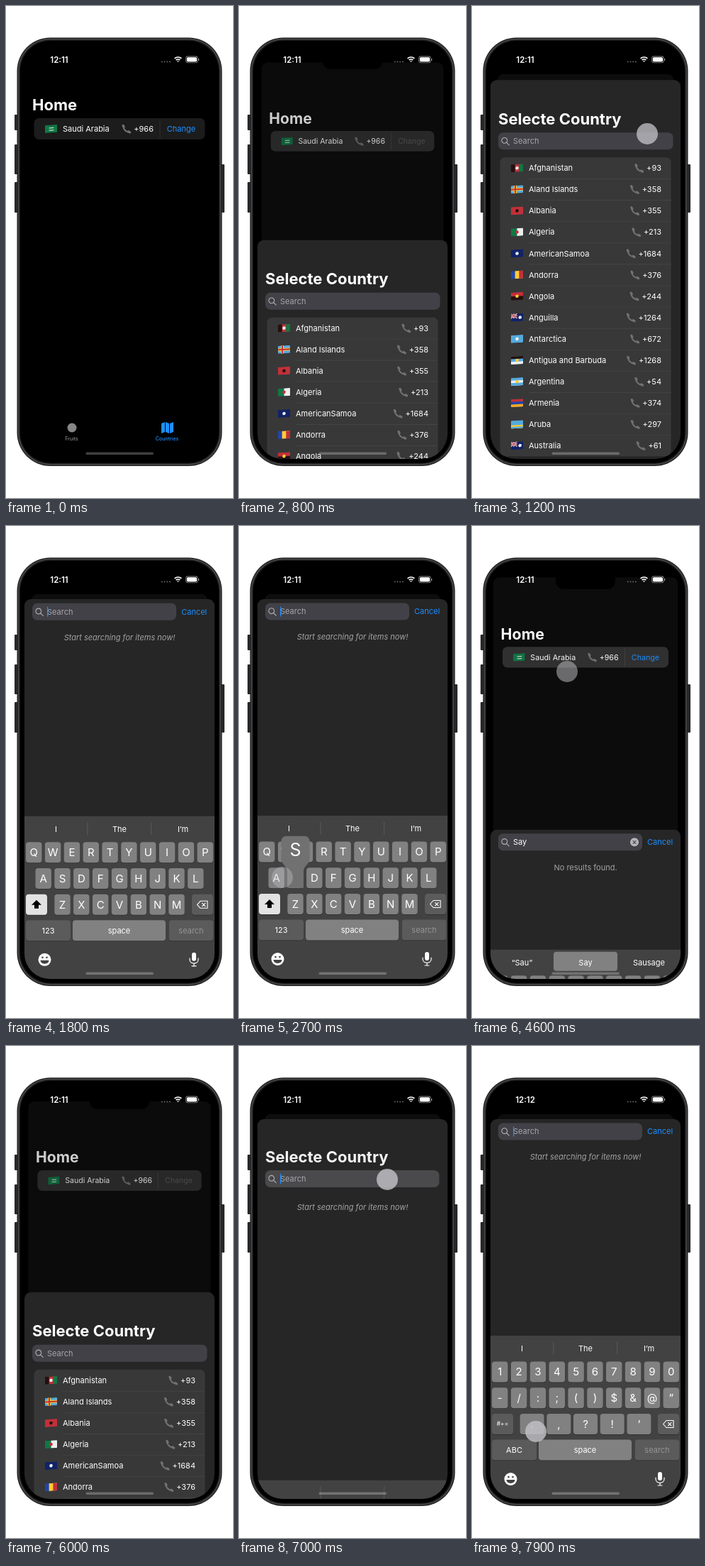
An HTML page with a canvas for the animation above (8 s loop, 320 by 693 pixels).

```html
<!DOCTYPE html>
<html lang="en">
<head>
<meta charset="utf-8">
<title>Country picker</title>
<style>
  html, body { margin: 0; width: 100%; height: 100%; overflow: hidden; background: #fff; }
  canvas { display: block; width: 320px; height: 693px; }
</style>
</head>
<body>
<canvas></canvas>
<script>
const canvas = document.querySelector('canvas');
const c = canvas.getContext('2d');
const LOOP = 8000, SCREEN_BOTTOM = 638, SHEET_TOP = 103, ROW = 30.08;
const BLUE = '#1e8fff', WHITE = '#fff';

// Flags: direction and stripe colours, then *disc, +cross or u for a canton
const dyes = { r: '#c23038', g: '#174', b: '#24a', n: '#126', s: '#5ad', w: '#eee', y: '#fc3', k: '#211', o: '#fa2' };
const countries = `Afghanistan +93 vkrg *w
Aland Islands +358 hs +y +r
Albania +355 hr *k
Algeria +213 vgw *r
AmericanSamoa +1684 hn *w
Andorra +376 vbyr
Angola +244 hrk *y
Anguilla +1264 hn u *w
Antarctica +672 hs *w
Antigua and Barbuda +1268 hksw *y
Argentina +54 hsws *y
Armenia +374 hrbo
Aruba +297 hsssys
Australia +61 hn u *w
Samoa +685 hr *n
San Marino +378 hws *y
Sao Tome and Principe +239 hgyg
Saudi Arabia +966 hg =w
Senegal +221 vgyr
Serbia +381 hrbw
Seychelles +248 vbyrwg
Sierra Leone +232 hgws
Singapore +65 hrw`.split('\n').map(line => {
  const [, name, code, flag] = line.match(/(.+) (\+\d+) (.+)/);
  return { name, code, flag: flag.split(' ') };
});
const home = countries.find(x => x.code === '+966');

const clamp = v => Math.max(0, Math.min(1, v));
const mix = (a, b, k) => a + (b - a) * k;
const smooth = v => v * v * (3 - 2 * v);
const gray = v => `rgb(${v},${v},${v})`;
function spring(ms, speed = 16) {
  const x = Math.max(0, ms) / 1000 * speed;
  return 1 - (1 + x) * Math.exp(-x);
}

function box(x, y, w, h, color, r = 0) {
  c.fillStyle = color;
  c.beginPath();
  c.roundRect(x, y, w, h, r);
  c.fill();
}
function disc(x, y, r, color) {
  box(x - r, y - r, 2 * r, 2 * r, color, r);
}
function shape(path, color) {
  c.fillStyle = color;
  c.fill(new Path2D(path));
}
function stroke(path, color, width) {
  c.strokeStyle = color;
  c.lineWidth = width;
  c.lineCap = c.lineJoin = 'round';
  c.stroke(new Path2D(path));
}
function text(s, x, y, size = 11, color = WHITE, align = 'left', style = '') {
  c.font = `${style} ${size}px Inter, sans-serif`;
  c.fillStyle = color;
  c.textAlign = align;
  c.fillText(s, x, y + size * 0.36);
  return c.measureText(s).width;
}
function at(x, y, draw) {
  c.save();
  c.translate(x, y);
  draw();
  c.restore();
}

function drawFlag([stripes, ...marks], y) {
  const w = 17, h = 11, colors = [...stripes.slice(1)].map(s => dyes[s]), n = colors.length;
  at(55, y - h / 2, () => {
    c.transform(1, -0.06, 0, 1, 0, 0.5);
    c.beginPath();
    c.roundRect(0, 0, w, h, 1);
    c.clip();
    colors.forEach((color, i) => stripes[0] === 'h'
      ? box(0, i * h / n, w, h, color) : box(i * w / n, 0, w, h, color));
    marks.forEach(([kind, dye], i) => {
      const color = dyes[dye];
      if (kind === '*') disc(i ? w * 0.75 : w / 2, h / 2, 2.3, color);
      if (kind === '+') stroke('M6 0V11M0 5.5H17', color, 4 - 2 * i);
      if (kind === '=') stroke('M6 4.3H12M6 7.5H12', color, 1);
      if (kind === 'u') for (const [ink, width] of [[WHITE, 1.6], [dyes.r, 0.8]])
        stroke('M0 0L8 6M8 0L0 6M4 0V6M0 3H8', ink, width);
    });
  });
}
function drawCode(code, right, y) {
  const width = text(code, right, y, 11, WHITE, 'right');
  at(right - width - 10.5, y, () => {
    stroke('M-4.8 -4C-4 1 -1 4 4.3 5', '#717173', 2);
    stroke('M-4.7 -4.6L-3.6 -2.7M3 3.8L5 5', '#717173', 3.2);
  });
}

function drawHome(p, presenting) {
  const s = 1 - 0.075 * p, raised = clamp(p * 4);
  c.save();
  c.translate(160, 57 + 39 * p);
  c.scale(s, s);
  c.translate(-160, -57);
  box(26, 57, 268, 581, gray(11 * raised + 9 * p * p), 9 * raised);
  text('Home', 37, 139, 22, WHITE, 'left', 'bold');
  box(39.5, 158, 241, 30, gray(mix(28, 50, raised)), 7);
  drawFlag(home.flag, 173);
  text(home.name, 80, 173);
  drawCode(home.code, 208, 173);
  box(216.7, 161, 0.7, 25, 'rgba(255,255,255,.12)');
  text('Change', 247, 173, 11, presenting ? '#5a5a5d' : BLUE, 'center');
  disc(93, 594, 6.5, '#868686');
  text('Fruits', 92.5, 609, 7, '#868686', 'center', '500');
  for (let i = 0; i < 3; i++) {
    const tilt = i % 2 ? 2 : -2;
    shape(`M${219 + 6 * i} ${587 - tilt / 2}l5 ${tilt}v14l-5 ${-tilt}z`, BLUE);
  }
  text('Countries', 227, 609, 7, BLUE, 'center', '500');
  box(26, 57, 268, 581, `rgba(0,0,0,${(presenting ? 0.35 : 0.08) * p})`);
  c.restore();
}

function drawList(items, top) {
  box(39.5, top, 241, items.length * ROW, '#383839', 7);
  items.forEach((item, i) => {
    const y = top + ROW * (i + 0.5);
    drawFlag(item.flag, y);
    text(item.name, 80, y);
    drawCode(item.code, 267, y);
    if (i) box(80, y - ROW / 2, 200.5, 0.6, 'rgba(255,255,255,.08)');
  });
}

function drawSearchField(y, width, searching, query, caret, pressed) {
  box(37, y - 12, width, 24, pressed ? '#4a4a4c' : '#414147', 7);
  at(46.5, y, () => stroke('M3.2 -.8A3.9 3.9 0 1 1 -4.6 -.8A3.9 3.9 0 1 1 3.2 -.8M2.1 2L5.8 5.6', '#b0b0b5', 1.1));
  const typed = text(query || 'Search', 58, y, 11, query ? WHITE : '#a5a5ab');
  if (searching && caret) box(query ? 58.5 + typed : 58, y - 7, 1.3, 14, BLUE);
  if (query) {
    disc(229, y, 6, '#b5b5b9');
    at(229, y, () => stroke('M-2 -2L2 2M2 -2L-2 2', '#414147', 1.1));
  }
}

function drawSheet(top, nav, searching, query, caret, pressed) {
  box(26, top, 268, 700, '#262626', [9, 9, 0, 0]);
  const y = top + mix(86, 17.5, nav);
  c.globalAlpha = clamp(1 - 1.8 * nav);
  text('Selecte Country', 37, y - 31.5, 22, WHITE, 'left', 'bold');
  c.globalAlpha = nav;
  text('Cancel', mix(293, 247, nav), y, 11, BLUE);
  c.globalAlpha = 1;

  const found = query && countries.filter(x => x.name.startsWith(query));
  if (!searching) drawList(countries.slice(0, 14), top + 109);
  else if (!query) text('Start searching for items now!', 160, y + mix(40, 36, nav), 11, '#a3a3a6', 'center', 'italic');
  else if (found.length) drawList(found, y + 23);
  else text('No results found.', 160, y + 36, 11, '#a3a3a6', 'center');
  drawSearchField(y, mix(246.5, 203, nav), searching, query, caret, pressed);
}

function drawKey(label, x, y, w = 22.5, fill = '#818181', size = 15, color = WHITE) {
  box(x - w / 2, y - 14, w, 29.3, '#2b2b2b', 4);
  box(x - w / 2, y - 14.5, w, 29, fill, 4);
  text(label, x, y, size, color, 'center');
}
function drawPopup(letter, x, y) {
  at(x, y, () => {
    box(-20, -59, 40, 38, '#717171', 7);
    shape('M-20 -28C-20 -18 -11.5 -18 -11.5 -9V14H11.5V-9C11.5 -18 20 -18 20 -28Z', '#717171');
    text(letter, 0, -39.5, 25, WHITE, 'center');
  });
}

function drawSuggestions(query) {
  const words = {
    '': ['I', 'The', 'I’m'], S: ['“S”', 'So', 'She'], Sa: ['“Sa”', 'Say', 'San'],
  }[query] || ['“Sau”', 'Say', 'Sausage'];
  if (query.length > 2) box(115, 411, 90, 27, '#818181', 4);
  else for (const x of [114.5, 204.3]) box(x, 416.5, 0.8, 18, '#5e5e5e');
  return () => words.forEach((word, i) => text(word, 70.5 + 89.5 * i, 426, 11, WHITE, 'center'));
}

function drawKeyboard(query, numeric, popup, ready) {
  const dark = '#5b5b5b', shifted = !query;
  box(26, 408, 268, 240, '#424242');
  const drawWords = drawSuggestions(query);
  if (ready) drawWords();

  let bubble;
  const rows = numeric ? ['1234567890', '-/:;()$&@”', '.,?!’'] : ['QWERTYUIOP', 'ASDFGHJKL', 'ZXCVBNM'];
  rows.forEach((row, r) => {
    const wide = row.length === 5, pitch = wide ? 37.7 : 26.83;
    [...row].forEach((char, i) => {
      const x = 160 + (i - (row.length - 1) / 2) * pitch, y = 459 + r * 36.7;
      const label = shifted ? char : char.toLowerCase();
      drawKey(label, x, y, wide ? 34 : 22.5);
      if (label === popup) bubble = [label, x, y];
    });
  });

  drawKey(numeric ? '#+=' : '', 43, 532.4, 30, shifted && !numeric ? '#e2e2e2' : dark, 8.5);
  if (!numeric) shape('M43 526l7 7h-4v5h-6v-5h-4z', shifted ? '#000' : WHITE);
  drawKey('', 277, 532.4, 30, dark);
  stroke('M269.5 532.5l4.5 -5h10v10h-10zM276.5 530.3l4.5 4.5m0 -4.5l-4.5 4.5', WHITE, 1.1);
  drawKey(numeric ? 'ABC' : '123', 59.5, 569, 63, dark, 11);
  drawKey('space', 159.5, 569, 131, '#818181', 11);
  drawKey('search', 261, 569, 62.5, dark, 11, query ? WHITE : '#949494');

  disc(54.5, 610, 9, WHITE);
  for (const x of [51.5, 57.5]) disc(x, 607, 1.3, '#424242');
  shape('M48.5 611h12c-.5 6.5 -11.5 6.5 -12 0z', '#424242');
  box(262, 600, 6, 12, WHITE, 3);
  stroke('M259 608v2c0 7 12 7 12 0v-2m-6 7.5v3.5m-3 0h6', WHITE, 1.2);
  if (bubble) drawPopup(...bubble);
}

function drawStatus(clock) {
  text(clock, 75, 75.5, 11.5, WHITE, 'center', '600');
  for (let i = 0; i < 4; i++) disc(219.8 + 3.7 * i, 78.5, 1.1, '#5c5c5e');
  at(242.5, 79, () => {
    for (const r of [1, 4, 7]) {
      c.strokeStyle = WHITE;
      c.lineWidth = 1.7;
      c.beginPath();
      c.arc(0, 0, r, -2.35, -0.8);
      c.stroke();
    }
  });
  box(253.2, 70.6, 17.4, 9.6, '#8a8a8a', 3);
  box(254, 71.4, 15.8, 8, '#000', 2.4);
  box(254.8, 72.2, 14.2, 6.4, WHITE, 1.8);
  box(271, 74, 1.2, 3, '#8a8a8a', 1);
}

function drawBody() {
  box(0, 0, 320, 693, WHITE);
  for (const [y, h] of [[153, 22], [195, 42], [248, 43]]) box(12, y, 6, h, '#29292b', 1);
  box(302, 223, 6, 68, '#29292b', 1);
  ['#242426', '#48484a', '#1b1b1c', '#000'].forEach((color, i) => {
    const inset = 1.5 * i;
    box(15.5 + inset, 44.5 + inset, 289 - 2 * inset, 603.5 - 2 * inset, color, 47 - inset);
  });
}

// A finger that fades in, glides to its second point and fades out
function finger(t, start, end, x, y, x2 = x, y2 = y) {
  const fade = 250, k = smooth(clamp((t - start) / (end - fade - start)));
  const strength = clamp(Math.min((t - start) / 140, (end - t) / fade));
  if (strength) disc(mix(x, x2, k), mix(y, y2, k), 15, `rgba(196,196,202,${0.8 * strength})`);
}
function drawFingers(t) {
  finger(t, 50, 720, 256, 174, 249, 178);
  finger(t, 1070, 1560, 247, 180);
  finger(t, 2400, 2820, 66, 492, 61, 495);
  finger(t, 2920, 3280, 50, 497);
  finger(t, 3350, 3750, 199, 462);
  finger(t, 3950, 4760, 134, 115, 134, 205);
  finger(t, 5270, 5750, 262, 176, 257, 178);
  finger(t, 6760, 7260, 209, 188);
  finger(t, 7500, 8150, 61, 562, 90, 543);
}

const typing = [['S', 2740], ['a', 3170], ['u', 3620]];

function draw(t) {
  const firstVisit = t < 5200, dismissed = t >= 4405 && firstVisit;
  const drag = smooth(clamp((t - 4000) / 500)) * 0.168;
  const p = firstVisit
    ? spring(t - 680) * (1 - drag) * (1 - spring(t - 4470, 13.5))
    : spring(t - 5887);
  const searchStart = firstVisit ? 1310 : 6965;
  const nav = spring(t - searchStart - 20);
  const keyboard = spring(t - searchStart) * (firstVisit ? 1 - spring(t - 4405) : 1);
  const typed = typing.filter(key => t >= key[1]).map(key => key[0]).join('');
  const query = !firstVisit ? '' : dismissed ? 'Say' : typed;
  const press = typing.find(key => t < key[1] && t > key[1] - 160);
  const presenting = !dismissed && (t > 660 && firstVisit || t > 5860);

  drawBody();
  c.save();
  c.beginPath();
  c.roundRect(26, 55, 268, SCREEN_BOTTOM - 55, 36);
  c.clip();
  drawHome(p, presenting);
  box(118, 50, 84, 39, '#000', 11);
  if (p > 0.002) {
    const pressed = Math.abs(t - searchStart - 20) < 120;
    drawSheet(mix(SCREEN_BOTTOM, SHEET_TOP, p), nav, t >= searchStart, query, !dismissed, pressed);
  }
  if (keyboard > 0.002) {
    at(0, 230 * (1 - keyboard), () =>
      drawKeyboard(query, t > 7650, press && press[0], t > searchStart + 100));
  }
  drawStatus(t < 7400 ? '12:11' : '12:12');
  box(112.5, 628.5, 95.5, 3.4, 'rgba(255,255,255,.25)', 1.7);
  drawFingers(t);
  c.restore();
}

const ratio = window.devicePixelRatio || 1;
canvas.width = 320 * ratio;
canvas.height = 693 * ratio;
c.scale(ratio, ratio);
const start = performance.now();
function frame() {
  draw((performance.now() - start) % LOOP);
  requestAnimationFrame(frame);
}
frame();
</script>
</body>
</html>
```
